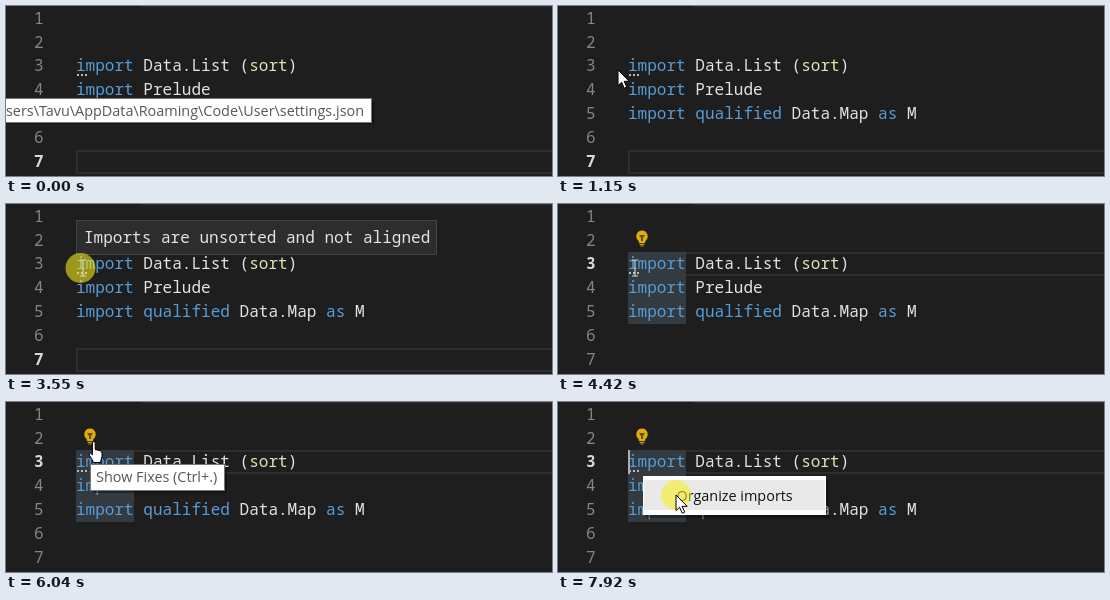
Recreate the animation shown at these times as an HTML page. Size 546x170 px, loop 8000 ms.

```html
<!DOCTYPE html>
<html lang="en">
<head>
<meta charset="utf-8">
<title>Organize imports</title>
<style>
  html, body { margin: 0; width: 100%; height: 100%; overflow: hidden; background: #1e1e1e; }
  svg { display: block; }
  text { white-space: pre; }
  .code { font: 500 16.04px "Noto Sans Mono", "DejaVu Sans Mono", monospace; fill: #e2e2e2; }
  .ui { font: 14.4px "Open Sans", "Noto Sans", sans-serif; fill: #575757; }
  .key { fill: #569cd6; }
  .fn { fill: #e2e2b4; }
  .num { fill: #858585; font-weight: 400; }
  .num.on { fill: #d8d8d8; font-weight: 600; }
  .tip { fill: #fff; stroke: #767676; }
  .shade { fill: #000; opacity: .35; }
  .pointer { fill: #fff; stroke: #000; stroke-linejoin: round; }
</style>
</head>
<body>
<svg width="546" height="170" viewBox="0 0 546 170">
  <rect width="546" height="170" fill="#1e1e1e"/>
  <rect x="136" width="410" height="1" fill="#303031"/>
  <rect id="line" x="71" width="500" height="22" fill="none" stroke="#2d2d2d" stroke-width="2"/>
  <g id="marks" fill="#333a40">
    <rect x="70" y="48" width="58" height="72"/>
  </g>
  <g id="numbers" class="code"></g>
  <g class="code">
    <text x="70" y="65"><tspan class="key">import</tspan> Data.List (<tspan class="fn">sort</tspan>)</text>
    <text x="70" y="89"><tspan class="key">import</tspan> Prelude</text>
    <text x="70" y="113"><tspan class="key">import qualified</tspan> Data.Map <tspan class="key">as</tspan> M</text>
  </g>
  <path d="M71 69h2m2 0h2m2 0h2" stroke="#b8b8b8" stroke-width="2"/>
  <rect id="caret" x="70" y="48" width="2" height="24" fill="#aeafad"/>

  <g id="bulb">
    <path d="M84 26.5a5.8 5.8 0 0 1 3.4 10.4L87 39h-6l-.4-2.1A5.8 5.8 0 0 1 84 26.5z" fill="#e0ac10"/>
    <path d="M81 31h6l-2 3v3h-2v-3z" fill="#66500f"/>
    <path d="M81.5 40.3h5M82.5 42h3" stroke="#c9980a" stroke-width="1.2"/>
  </g>

  <g id="hover">
    <rect x="70.5" y="16.5" width="360" height="34" fill="#2d2d30" stroke="#454545"/>
    <text class="code" x="78" y="39">Imports are unsorted and not aligned</text>
  </g>

  <g id="pathTip">
    <rect class="shade" x="0" y="96" width="368" height="22"/>
    <rect class="tip" x="-5" y="92.5" width="370.5" height="24"/>
    <text class="ui" x="0" y="110">sers\Tavu\AppData\Roaming\Code\User\settings.json</text>
  </g>

  <g id="fixTip">
    <rect class="shade" x="87" y="65" width="134" height="26"/>
    <rect class="tip" x="84.5" y="62.5" width="134" height="26"/>
    <text class="ui" x="90" y="80">Show Fixes (Ctrl+.)</text>
  </g>

  <g id="menu">
    <rect class="shade" x="88" y="78" width="183" height="38"/>
    <rect x="85" y="74" width="183" height="39" fill="#fff"/>
    <rect id="item" x="86" y="78" width="181" height="30" fill="#e9e9e9"/>
    <text class="ui" x="118.5" y="99" style="fill:#111">Organize imports</text>
  </g>

  <circle id="click" r="15" fill="#f8f01c" opacity=".58"/>
  <g id="mouse">
    <path id="arrow" class="pointer" d="M0 0V15.6L3.6 12.3 6.2 18.2 8.7 17.1 6.1 11.3H11.2z"/>
    <path id="beam" d="M-3-8h2q1 0 1 1 0-1 1-1h2M0-7V7M-3 8h2q1 0 1-1 0 1 1 1h2" fill="none" stroke="#d8d8d8" stroke-width="1.1"/>
    <path id="hand" class="pointer" d="M.4 1Q.4-.6 1.8-.6T3.2 1V7.6L8 8.6Q10 9.2 10 11.4V14.5L8.4 20.5H1.6L-2.4 13.4Q-3 11.4-1.6 11L.4 12.8z"/>
  </g>
</svg>
<script>
  const LOOP = 8000;
  const $ = id => document.getElementById(id);

  // Each row: start time, x, y, pointer shape
  const mouse = [
    [0, -40, 110, 'arrow'],
    [920, 8, 98, 'arrow'], [1000, 28, 86, 'arrow'], [1070, 46, 74, 'arrow'],
    [1150, 60, 64, 'arrow'], [1230, 66, 64, 'arrow'], [1300, 71, 64, 'beam'],
    [1380, 75, 64, 'beam'], [1460, 77, 64, 'beam'],
    [4500, 79, 59, 'beam'], [4570, 82, 53, 'beam'], [4650, 85, 48, 'beam'],
    [4730, 86, 40, 'hand'], [6510, 86, 39, 'arrow'],
    [7060, 88, 44, 'arrow'], [7140, 94, 56, 'arrow'], [7210, 102, 70, 'arrow'],
    [7290, 110, 82, 'arrow'], [7370, 115, 89, 'arrow'], [7440, 117, 92, 'arrow'],
    [7520, 118, 93, 'arrow']
  ];

  // Each row: start time, opacity
  const fades = {
    pathTip: [[0, 1], [760, .6], [840, .25], [920, 0]],
    hover: [[0, 0], [1770, .5], [1840, 1], [3630, 0]],
    marks: [[0, 0], [3870, 1]],
    bulb: [[0, 0], [3870, 1]],
    caret: [[0, 0], [3630, 1], [4100, 0], [4600, 1], [5120, 0], [5580, 1], [6040, 0], [6510, 1], [7060, 0], [7520, 1]],
    fixTip: [[0, 0], [5120, .25], [5190, .5], [5270, .8], [5340, 1], [6510, .5], [6590, .12], [6680, 0]],
    menu: [[0, 0], [6510, .6], [6590, 1]],
    item: [[0, 0], [7290, 1]],
    click: [[0, 0], [3550, .58], [3630, 0], [6440, .58], [6510, 0], [7920, .58]]
  };

  const numbers = [];
  for (let n = 1; n <= 7; n++) {
    const label = document.createElementNS('http://www.w3.org/2000/svg', 'text');
    label.setAttribute('x', 28);
    label.setAttribute('y', n * 24 - (n < 3 ? 6 : 7));
    label.textContent = n;
    $('numbers').append(label);
    numbers.push(label);
  }

  const at = (rows, t) => rows.findLast(row => row[0] <= t);

  function draw(t) {
    for (const id in fades) $(id).setAttribute('opacity', at(fades[id], t)[1]);

    const [, x, y, shape] = at(mouse, t);
    $('mouse').setAttribute('transform', `translate(${x} ${y})`);
    for (const id of ['arrow', 'beam', 'hand']) $(id).style.display = id === shape ? '' : 'none';
    $('click').setAttribute('cx', shape === 'beam' ? x - 2.5 : x);
    $('click').setAttribute('cy', y);

    const current = t < 3630 ? 7 : 3;
    $('line').setAttribute('y', current * 24 - 23);
    numbers.forEach((label, i) => label.setAttribute('class', i + 1 === current ? 'num on' : 'num'));
  }

  const start = performance.now();
  function tick() {
    draw((performance.now() - start) % LOOP);
    requestAnimationFrame(tick);
  }
  tick();
</script>
</body>
</html>
```
